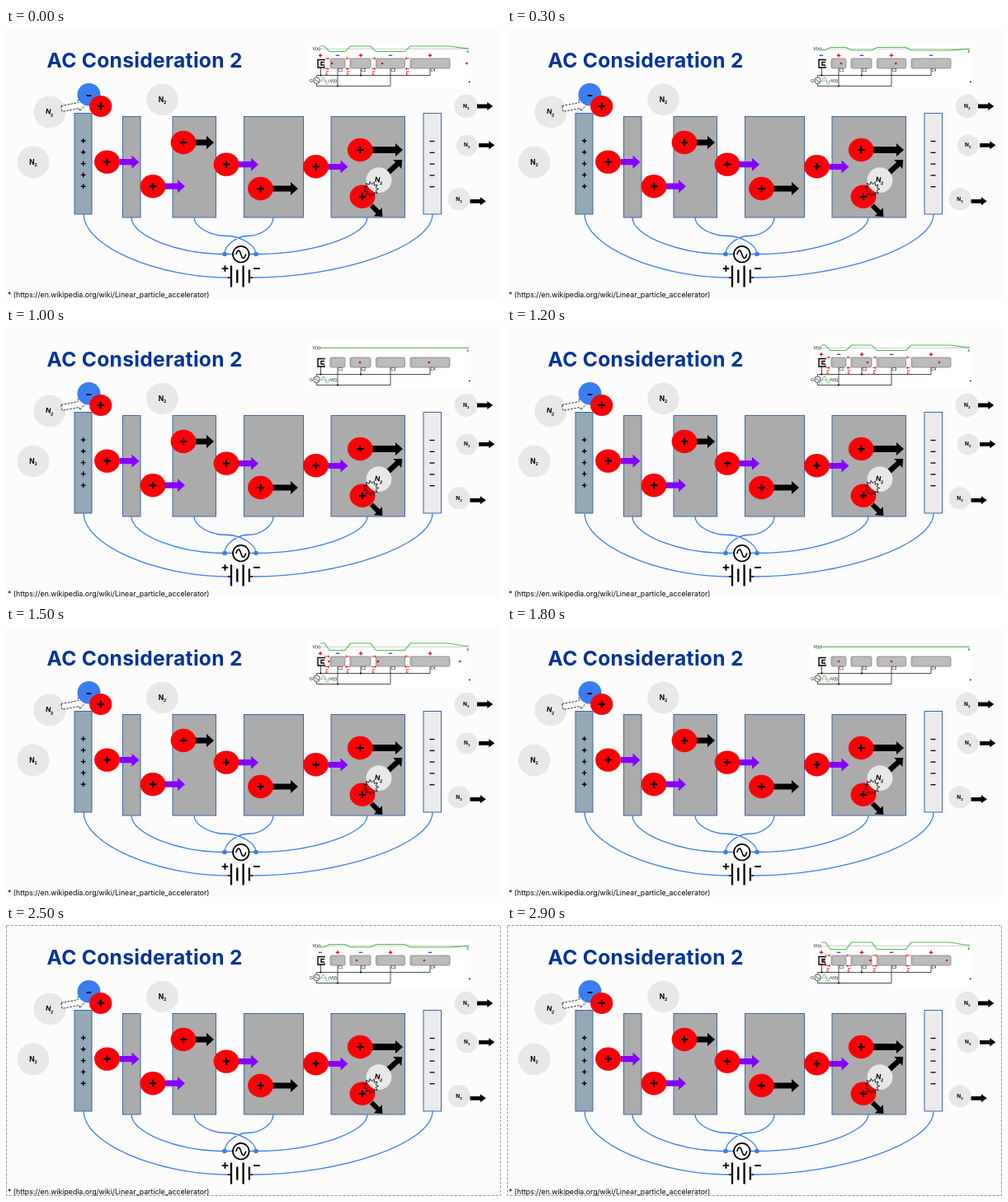
An HTML page that plays this animation: 600x329 px, repeating every 3 s.

```html
<!DOCTYPE html>
<html lang="en">
<head>
<meta charset="utf-8">
<title>AC Consideration</title>
<style>
html, body { margin: 0; width: 100%; height: 100%; overflow: hidden; background: #fcfcfc; }
svg { display: block; width: 600px; height: 329px; }
text { font-family: Inter, "Noto Sans", sans-serif; }
.small { font-family: "Liberation Sans", Arial, sans-serif; }
</style>
</head>
<body>
<svg id="stage" viewBox="0 0 600 329"></svg>
<script>
const stage = document.getElementById("stage");
const BLUE = "#3b7df0", EDGE = "#3f64a5", RED = "#e00000", PURPLE = "#8400ff";
const LOOP = 3000, STEP = 100, PERIOD = 1600;

function add(tag, attrs, parent = stage) {
  const node = document.createElementNS("http://www.w3.org/2000/svg", tag);
  for (const key in attrs) node.setAttribute(key, attrs[key]);
  return parent.appendChild(node);
}
function path(d, stroke, width = 1, extra = {}, parent = stage) {
  return add("path", { d, stroke, "stroke-width": width, fill: "none", ...extra }, parent);
}
function label(x, y, str, size, extra = {}, parent = stage) {
  const node = add("text", { x, y, "font-size": size, ...extra }, parent);
  node.textContent = str;
  return node;
}
function box(x, y, w, h, fill) {
  add("rect", { x, y, width: w, height: h, fill, stroke: EDGE, "stroke-width": 1 });
}
function plus(x, y, r, width, color = "#000", parent = stage) {
  path(`M${x - r} ${y}h${2 * r}M${x} ${y - r}v${2 * r}`, color, width, {}, parent);
}
function minus(x, y, r, width, color = "#000", parent = stage) {
  path(`M${x - r} ${y}h${2 * r}`, color, width, {}, parent);
}
function arrowShape(len, half, head, wide) {
  const neck = len - head;
  return `M0 ${-half}H${neck}V${-wide}L${len} 0L${neck} ${wide}V${half}H0Z`;
}
function arrow(x, y, len, color, angle = 0, half = 3.6, head = 9, wide = 8) {
  add("path", { d: arrowShape(len, half, head, wide), fill: color,
    transform: `translate(${x} ${y}) rotate(${angle})` });
}
function ion(x, y, rx = 15.4, ry = 14.2) {
  add("ellipse", { cx: x, cy: y, rx, ry, fill: "#fb0007" });
  plus(x, y, 4.2, 2);
}
function nitrogen(x, y, r, size, angle = 0) {
  add("circle", { cx: x, cy: y, r, fill: "#e8e8e8" });
  const t = label(x, y + size * 0.3, "N", size, { "font-weight": 700, "text-anchor": "middle",
    transform: `rotate(${angle} ${x} ${y})` });
  add("tspan", { "font-size": size * 0.62, dy: size * 0.32 }, t).textContent = "2";
}
// Wire that leaves vertically and arrives horizontally
function bend(x0, y0, x1, y1) {
  return `M${x0} ${y0}C${x0} ${(y0 + y1) / 2} ${(x0 + x1) / 2} ${y1} ${x1} ${y1}`;
}
// Wire that leaves and arrives vertically
function sCurve(x0, y0, x1, y1) {
  const xm = (x0 + x1) / 2, ym = (y0 + y1) / 2, q = (y1 - y0) / 4, w = (x1 - x0) / 4;
  return `M${x0} ${y0}C${x0} ${y0 + q} ${x0 + w} ${ym} ${xm} ${ym}S${x1} ${ym + q} ${x1} ${y1}`;
}

// Slide
label(49.5, 47.5, "AC Consideration 2", 24.6, { "font-weight": 700, fill: "#003399", "letter-spacing": 0.3 });
label(2, 327, "* (https://en.wikipedia.org/wiki/Linear_particle_accelerator)", 8.72);

box(83, 103.5, 21, 122.5, "#95a8b5");
for (const [x, w] of [[141.5, 21.5], [202, 52.5], [288.5, 72], [394, 89.5]]) box(x, 107.5, w, 122.5, "#ababab");
box(506, 103.5, 21.5, 122.5, "#ebebeb");
for (let i = 0; i < 5; i++) {
  plus(93.7, 137 + i * 13.8, 2.8, 1.4);
  minus(516.5, 137.5 + i * 13.8, 3, 1.3);
}

path(bend(94, 226, 270, 303) + bend(517, 226, 298, 303) + bend(152, 230, 265, 274.5) +
  bend(438, 230, 303, 274.5) + sCurve(228, 230, 303, 274.5) + sCurve(324, 230, 265, 274.5) +
  "M265 274.5H303", BLUE, 1.3);
for (const x of [265, 303]) add("circle", { cx: x, cy: 274.5, r: 2.8, fill: BLUE });
add("circle", { cx: 284.8, cy: 274.7, r: 9.8, fill: "#fff", stroke: "#000", "stroke-width": 1.7 });
path("M278.8 275C280.5 268.5 283 268.5 284.8 274.7S289 281 290.8 274.5", "#000", 1.6);

for (const x of [273, 287.6]) path(`M${x} 288.5v26M${x + 7.3} 293.5v16`, "#000", 2.3);
path("M269 303H273M295 303H299", "#000", 1.4);
plus(265.5, 292, 3.7, 1.9);
minus(304, 292, 4, 1.9);

nitrogen(53, 102, 19.5, 8.4, 8);
nitrogen(33, 163, 19.5, 8.4);
nitrogen(189.5, 87, 19.3, 8.4);
nitrogen(557.8, 95, 14.2, 6.4);
nitrogen(558.8, 142.5, 13, 6.4);
nitrogen(549, 207.8, 13.6, 6.4);

add("path", { d: arrowShape(30, 3.5, 9, 7), fill: "#fff", stroke: "#222", "stroke-width": 0.9,
  "stroke-dasharray": "2.5 1.5", transform: "translate(67.5 98) rotate(-11)" });
add("ellipse", { cx: 100.5, cy: 80.7, rx: 14, ry: 13.8, fill: BLUE });
minus(100.5, 82, 2.8, 2);
ion(114.7, 95, 13.6, 13);

for (const [x, y] of [[137.5, 162.7], [193, 192.2], [282, 165.7], [390.5, 168.5]]) arrow(x, y, 24, PURPLE);
arrow(229, 139, 23, "#000");
arrow(322, 195, 32, "#000");
arrow(443, 148, 38, "#000", 0, 4);
arrow(462, 176.5, 24.5, "#000", -42, 3.2, 8, 7.5);
arrow(443, 215.5, 19, "#000", 45, 3, 8, 7);
for (const [x, y] of [[571, 95], [573, 142.3], [562.5, 210.3]]) arrow(x, y, 19.3, "#000", 0, 2.4, 7, 5);
for (const [x, y] of [[122.5, 162.6], [178, 192.3], [215, 139], [267, 165.6], [308.5, 195],
  [375.5, 168.3], [429.3, 148], [432, 204.8]]) ion(x, y);
nitrogen(452, 184.7, 15.4, 8.4, 8);

let burst = "";
for (let i = 0; i < 22; i++) {
  const r = i % 2 ? 5.8 : 9.2, a = i * Math.PI / 11;
  burst += `${i ? "L" : "M"}${(442.5 + r * Math.cos(a)).toFixed(1)} ${(195.5 + r * Math.sin(a)).toFixed(1)}`;
}
path(burst + "Z", "#111", 0.9);

// Accelerator inset
const tubes = [[393, 411], [417, 442], [448.5, 483.5], [490, 538]];
const mids = [381, 402, 430, 466, 514];
const gaps = [389, 414.5, 445.5, 486.5];

add("rect", { x: 367, y: 18, width: 197, height: 57, fill: "#fff" });
path("M380 25.3H561", "#999", 0.5);
path("M376.5 59.5V57.5H514V49M381.5 48V57.5M430 49V57.5M376.5 68V70.5H466V49M402 49V70.5", "#222", 0.8);
for (const [x, y] of [[381.5, 57.5], [430, 57.5], [402, 70.5]]) add("circle", { cx: x, cy: y, r: 1.1 });
add("circle", { cx: 376.5, cy: 63.8, r: 3.8, fill: "#fff", stroke: "#222", "stroke-width": 0.8 });
path("M374 64q1.3 -3 2.5 0t2.5 0", "#222", 0.7);
path("M382 64.5C384 58 385.5 59 387 64S390 70 392 63", "#35b535", 0.8);
path("M381 64.5H392", "#888", 0.4);
path("M386 39.5V38.5H378V48H386V46.5M386 41.5H382V45H386", "#000", 1.4);
tubes.forEach(([a, b], i) => {
  add("rect", { x: a, y: 37, width: b - a, height: 12, rx: 1.8, fill: "#bcbcbc", stroke: "#777", "stroke-width": 0.7 });
  path(`M${a + 1.4} 37.5q1.8 5.5 0 11`, "#999", 0.5);
  label(mids[i + 1] + 0.5, 53.2, "C" + (i + 1), 4.6, { class: "small" });
});
label(371.5, 27, "V(x)", 5.2, { class: "small" });
label(368, 66, "G", 5.2, { class: "small" });
label(392.5, 66, "V(t)", 5.2, { class: "small" });
label(558.5, 30, "x", 4.6, { class: "small" });
add("circle", { cx: 561.8, cy: 65.3, r: 0.9 });

const curve = path("", "#4fc04f", 1.1);
const signs = [1, -1].map(side => {
  const g = add("g", {});
  mids.forEach((x, i) => {
    if ((i % 2 ? 1 : -1) * side > 0) plus(x, 33.3, 2.2, 1.2, RED, g);
    else minus(x, 33.3, 2.2, 1.2, "#2030e0", g);
  });
  return g;
});
const field = add("g", {});
const fieldArrows = path("", RED, 0.8, {}, field);
gaps.forEach(x => {
  label(x - 1.8, 57, "E", 4.8, { class: "small", fill: RED, "font-style": "italic" }, field);
  path(`M${x - 1.5} 52.6h3.6`, RED, 0.5, {}, field);
});
const dots = [0, 1, 2].map(() => add("circle", { cy: 43, r: 1.3, fill: RED }));
const frame = add("rect", { x: 0.5, y: 0.5, width: 599, height: 328, fill: "none",
  stroke: "#777", "stroke-width": 0.8, "stroke-dasharray": "3 2" });

// Age in ms and position of one particle
const track = [[-400, 382], [-300, 384], [0, 395], [200, 402], [600, 414], [900, 425], [1200, 437],
  [1300, 440.5], [1600, 456], [1800, 466], [2200, 487], [2500, 507], [2800, 524], [2900, 533], [3200, 558.5]];

function place(age) {
  for (let i = 1; i < track.length; i++) {
    const [a, x] = track[i - 1], [b, y] = track[i];
    if (age >= a && age <= b) return x + (y - x) * (age - a) / (b - a);
  }
  return null;
}

function draw(ms) {
  const t = Math.floor(ms / STEP) * STEP;
  const v = Math.sin(2 * Math.PI * (t - 200) / PERIOD), size = Math.abs(v);
  const hi = (25.3 - 4.6 * v).toFixed(2), lo = (25.3 + 4.6 * v).toFixed(2);
  const tail = (25.3 + 0.8 * v).toFixed(2);
  curve.setAttribute("d", `M381 ${lo}H386L392 ${hi}H411L417.5 ${lo}H442L448.5 ${hi}H483.5L490 ${lo}H534` +
    `C546 ${lo} 548 ${tail} 561 ${tail}`);
  signs[0].style.display = v > 0.1 ? "" : "none";
  signs[1].style.display = v < -0.1 ? "" : "none";

  field.style.display = size > 0.5 ? "" : "none";
  fieldArrows.setAttribute("d", gaps.map((x, i) => {
    const dir = (i % 2 ? 1 : -1) * Math.sign(v), half = 3.2 * size;
    return [37, 49.5].map(y => {
      const tip = x + dir * half;
      return `M${x - dir * half} ${y}H${tip}m${-dir * 1.8} -1.4L${tip} ${y}l${-dir * 1.8} 1.4`;
    }).join("");
  }).join(""));

  const base = (t + 400) % PERIOD - 400;
  dots.forEach((dot, i) => {
    const x = place(base + i * PERIOD);
    dot.style.display = x === null ? "none" : "";
    if (x !== null) dot.setAttribute("cx", x);
  });
  frame.style.display = t >= 2400 ? "" : "none";
}

const start = performance.now();
function tick() {
  draw((performance.now() - start) % LOOP);
  requestAnimationFrame(tick);
}
tick();
</script>
</body>
</html>
```
